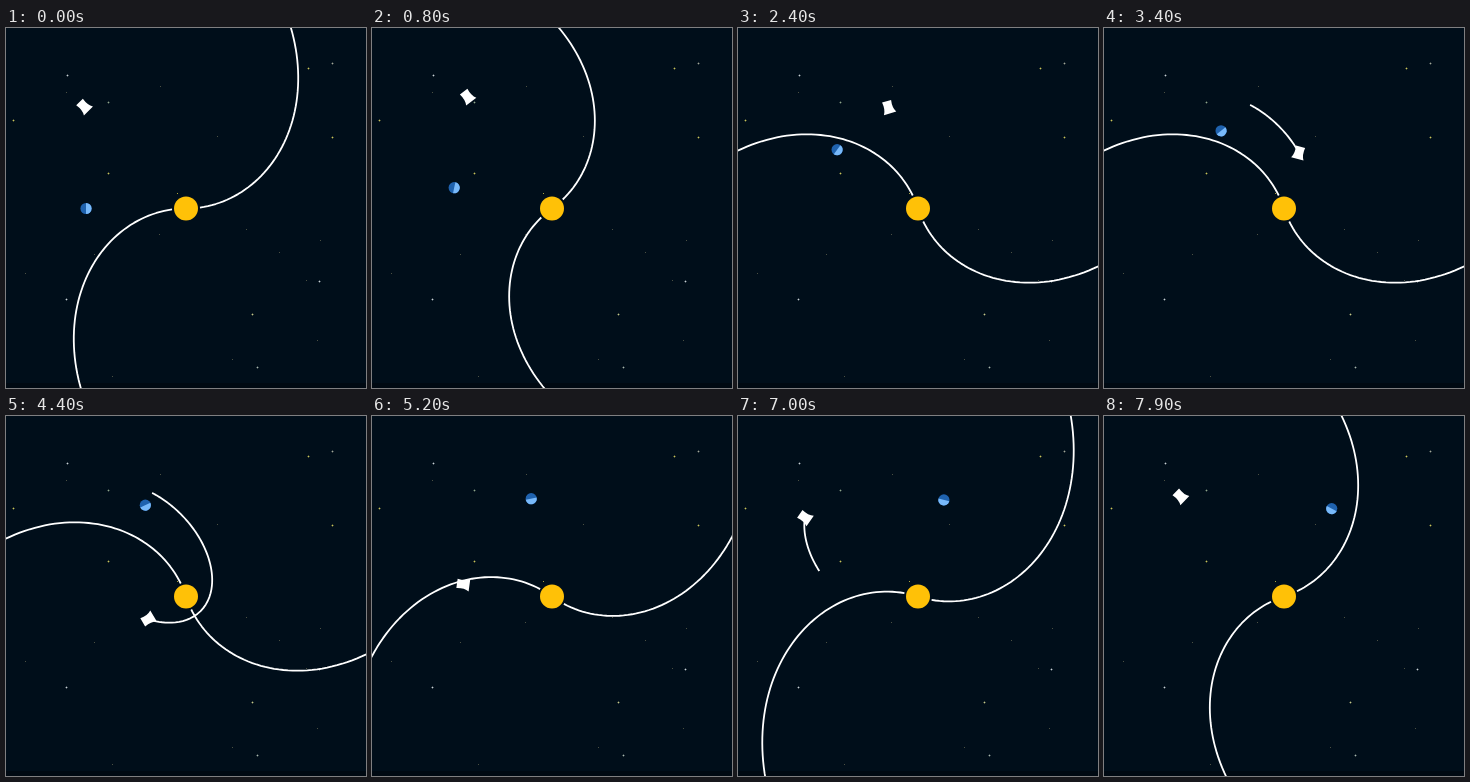
These frames come from a looping animation (360 by 360 pixels, 8 s). An HTML page with a canvas:

```html
<!DOCTYPE html>
<html lang="en">
<head>
<meta charset="utf-8">
<title>Probe orbit</title>
<style>
  html, body { margin: 0; width: 100%; height: 100%; overflow: hidden; background: #000e1a; }
  canvas { display: block; width: 100vw; height: 100vh; }
</style>
</head>
<body>
<canvas id="stage" width="360" height="360"></canvas>
<script>
const ctx = document.getElementById('stage').getContext('2d');
const TAU = Math.PI * 2, RAD = Math.PI / 180;
const LOOP = 8000, STEP = 100;
const SUN = { x: 180, y: 180.5 };
const ORBIT = { a: 82.5, e: 0.75, tilt: 45 * RAD };

// While the spiral is held still, the probe leaves a trail.
const HOLDS = [[2400, 4400], [5600, 7100]];

const WHITE = '#c9d2d6', YELLOW = '#c9c35a';
const BRIGHT = [
  [61, 47, WHITE], [102, 74, '#8fa58c'], [7, 92, YELLOW], [102, 145, YELLOW],
  [60, 271, WHITE], [302, 40, YELLOW], [326, 35, '#a3a89a'], [326, 109, YELLOW],
  [246, 286, '#c5c98a'], [313, 253, WHITE], [251, 339, '#a9b8b0']
];
const FAINT = [
  [154, 58], [211, 108], [153, 206], [240, 201], [273, 224], [314, 212], [300, 252],
  [311, 312], [226, 331], [19, 245], [88, 226], [60, 64], [106, 348]
];

function disc(x, y, r, color, from = 0, to = TAU) {
  ctx.fillStyle = color;
  ctx.beginPath();
  ctx.arc(x, y, r, from, to);
  ctx.fill();
}

function strokePoints(points) {
  ctx.beginPath();
  points.forEach(p => ctx.lineTo(p.x, p.y));
  ctx.stroke();
}

const polar = (r, angle) => ({
  x: SUN.x + r * Math.cos(angle),
  y: SUN.y + r * Math.sin(angle)
});

// Kepler orbit, closest to the sun halfway through the loop
function probeAt(t) {
  const { a, e, tilt } = ORBIT;
  const mean = (t / LOOP - 0.5) * TAU;
  let E = mean + e * Math.sin(mean);
  for (let i = 0; i < 12; i++) {
    E -= (E - e * Math.sin(E) - mean) / (1 - e * Math.cos(E));
  }
  const angle = Math.atan2(Math.sqrt(1 - e * e) * Math.sin(E), Math.cos(E) - e);
  return polar(a * (1 - e * Math.cos(E)), angle + tilt);
}

function drawSky() {
  ctx.fillStyle = '#000e1a';
  ctx.fillRect(0, 0, 360, 360);
  ctx.fillStyle = '#000912';
  ctx.fillRect(0, 355, 360, 5);
  for (const [x, y, color] of BRIGHT) {
    ctx.fillStyle = color;
    ctx.globalAlpha = 0.35;
    ctx.fillRect(x - 1, y, 3, 1);
    ctx.fillRect(x, y - 1, 1, 3);
    ctx.globalAlpha = 1;
    ctx.fillRect(x, y, 1, 1);
  }
  ctx.fillStyle = '#4b5043';
  for (const [x, y] of FAINT) ctx.fillRect(x, y, 1, 1);
  ctx.fillStyle = '#a8a23c';
  ctx.fillRect(171, 165, 1, 1);
}

function drawSpiral(t) {
  const held = HOLDS.reduce((sum, [a, b]) => sum + Math.max(0, Math.min(t, b) - a), 0);
  const turn = -45 * RAD * (t - held) / 1000;
  for (const start of [turn, turn + Math.PI]) {
    const arm = [];
    for (let r = 14; r <= 270; r += 4) arm.push(polar(r, start - r / 200));
    strokePoints(arm);
  }
}

function drawTrail(t) {
  const hold = HOLDS.find(([a, b]) => t >= a && t <= b);
  if (!hold) return;
  const trail = [];
  for (let s = hold[0] - STEP; s <= t; s += 25) trail.push(probeAt(s));
  strokePoints(trail);
}

function drawPlanet(t) {
  const angle = Math.PI + 15 * RAD * t / 1000;
  const p = polar(100, angle);
  disc(p.x, p.y, 5.6, '#1f62ae');
  disc(p.x, p.y, 5.6, '#78b9fa', angle + Math.PI / 2, angle + Math.PI * 1.5);
}

function drawProbe(t) {
  const p = probeAt(t);
  ctx.save();
  ctx.translate(p.x, p.y);
  ctx.rotate(Math.atan2(SUN.y - p.y, SUN.x - p.x));
  ctx.fillStyle = '#fff';
  ctx.beginPath();
  ctx.moveTo(-6.2, -4.7);
  ctx.quadraticCurveTo(1.5, -3.4, 6.4, -6.4);
  ctx.lineTo(6.4, 6.4);
  ctx.quadraticCurveTo(1.5, 3.4, -6.2, 4.7);
  ctx.fill();
  ctx.restore();
}

function draw(t) {
  drawSky();
  ctx.strokeStyle = '#fff';
  ctx.lineWidth = 1.8;
  ctx.lineJoin = 'round';
  drawSpiral(t);
  drawTrail(t);
  disc(SUN.x, SUN.y, 12, '#ffc107');
  drawPlanet(t);
  drawProbe(t);
}

const begin = performance.now();
function tick() {
  const t = (performance.now() - begin) % LOOP;
  draw(Math.floor(t / STEP) * STEP);
  requestAnimationFrame(tick);
}
tick();
</script>
</body>
</html>
```
